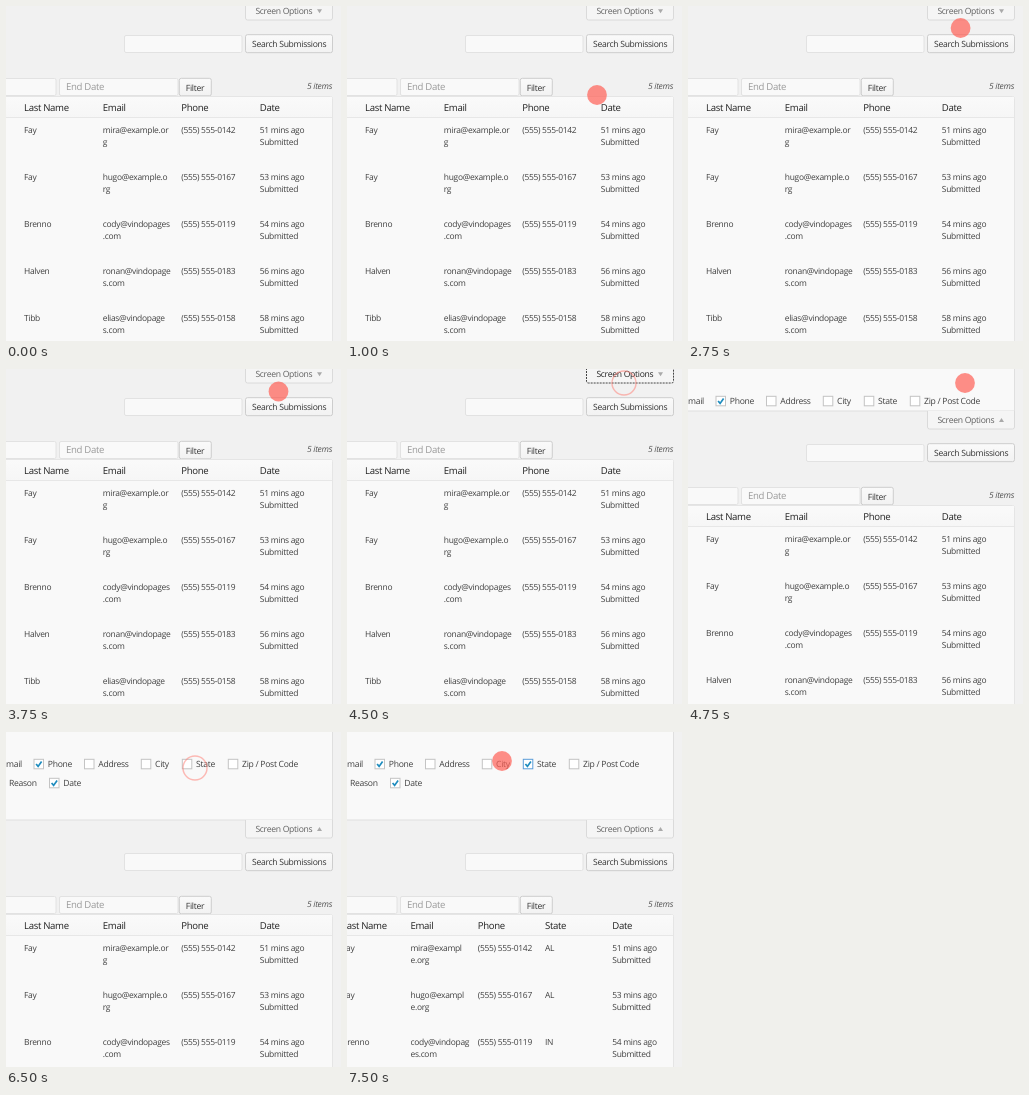
Recreate the animation shown at these times as an HTML page. Size 335 px wide and 335 px high, loop 8 s.

```html
<!DOCTYPE html>
<html lang="en">
<head>
<meta charset="utf-8">
<title>Submissions table</title>
<style>
  html, body { margin: 0; width: 100%; height: 100%; overflow: hidden; background: #f1f1f1; }
  svg { display: block; width: 100%; height: 100%; }
  text {
    font-family: "Open Sans", "Noto Sans", sans-serif;
    white-space: pre;
    letter-spacing: -.034em;
    text-rendering: geometricPrecision;
  }
</style>
</head>
<body>
<svg id="stage" viewBox="0 0 335 335"></svg>
<script>
const LOOP = 8000, TICK = 250, OPEN = 92;
const CLICKS = [4500, 6500];
const STATE_ON = 6750;
const stage = document.getElementById('stage');

// time, x, y
const PATH = [
  [1000, 250, 89], [1250, 248, 170], [1500, 186, 209], [1750, 198, 186],
  [2000, 232, 137], [2250, 268, 62], [2500, 283, 28], [2750, 272.6, 22],
  [3000, 272.6, 22], [3250, 268, 31], [4250, 277, 14], [5000, 277, 14],
  [5500, 275, 34], [5750, 258, 26], [6250, 196, 30], [6500, 189, 36],
  [6750, 189, 36], [7250, 168, 20], [7500, 155, 29]
];

// last name, mail user, mail domain, wrap points (wide, narrow), phone end, state, minutes
const ROWS = [
  ['Fay', 'mira', 'example.org', 15, 11, '0142', 'AL', 51],
  ['Fay', 'hugo', 'example.org', 14, 11, '0167', 'AL', 53],
  ['Brenno', 'cody', 'vindopages.com', 15, 13, '0119', 'IN', 54],
  ['Halven', 'ronan', 'vindopages.com', 15, 13, '0183', 'IN', 56],
  ['Tibb', 'elias', 'vindopages.com', 15, 13, '0158', 'AL', 58]
];

const text = (x, y, s, size = 8.6, fill = '#404040', extra = '') =>
  `<text x="${x}" y="${y}" font-size="${size}" fill="${fill}" ${extra}>${s}</text>`;
const rect = (x, y, w, h, fill, stroke = 'none', r = 0) =>
  `<rect x="${x}" y="${y}" width="${w}" height="${h}" rx="${r}" fill="${fill}" stroke="${stroke}"/>`;
const button = (x, y, w, h, label, tx) =>
  rect(x, y, w, h, 'url(#button)', '#cdcdcd', 2) + text(tx, y + 12.2, label, 8.6, '#333');
const input = (x, y, w) => rect(x, y, w, 17, '#f9f9f9', '#e2e2e2', 1.5);

const DEFS = `<defs>
  <linearGradient id="button" x2="0" y2="1"><stop stop-color="#fafafa"/><stop offset="1" stop-color="#f2f2f2"/></linearGradient>
  <linearGradient id="head" x2="0" y2="1"><stop stop-color="#fafafa"/><stop offset="1" stop-color="#f6f6f6"/></linearGradient>
</defs>`;

function cursorAt(t) {
  if (t < PATH[0][0]) return null;
  const i = PATH.findIndex(p => p[0] > t);
  if (i < 0) return PATH[PATH.length - 1].slice(1);
  const [t0, x0, y0] = PATH[i - 1], [t1, x1, y1] = PATH[i];
  const k = (t - t0) / (t1 - t0);
  return [x0 + (x1 - x0) * k, y0 + (y1 - y0) * k];
}

function table(withState) {
  const cols = withState ? [-5, 63.5, 130.8, 198, 265.3] : [18, 96.8, 175.2, 0, 253.8];
  const titles = ['Last Name', 'Email', 'Phone', 'State', 'Date'];
  let out = rect(-5, 90.5, 331.5, 260, '#f9f9f9', '#e5e5e5', 2)
    + rect(-5, 91, 331, 20.5, 'url(#head)')
    + rect(-5, 111, 331, 0.9, '#e6e6e6');
  const shown = i => withState || i !== 3;
  titles.forEach((s, i) => { if (shown(i)) out += text(cols[i], 104.8, s, 9.6, '#222'); });
  ROWS.forEach(([last, user, domain, wide, narrow, end, state, mins], n) => {
    const y = 127 + 47 * n, mail = user + '@' + domain, cut = withState ? narrow : wide;
    const cells = [[last], [mail.slice(0, cut), mail.slice(cut)], ['(555) 555-' + end],
      [state], [mins + ' mins ago', 'Submitted']];
    cells.forEach((lines, i) => {
      if (shown(i)) lines.forEach((s, j) => { out += text(cols[i], y + 12 * j, s, 8.45); });
    });
  });
  return out;
}

function checkbox(x, y, label, on, focus) {
  return rect(x + 0.5, y - 4.7, 9.5, 9.5, '#fff', focus ? '#5b9dd9' : '#c4c4c4')
    + (on ? `<path d="M${x + 2.6} ${y}l2 2.4 3.5-5" fill="none" stroke="#1e8cbe" stroke-width="1.7"/>` : '')
    + text(x + 14.3, y + 3.1, label);
}

function panel(slide, stateOn) {
  const bottom = slide - 4;
  if (bottom <= 0) return '';
  return `<clipPath id="fold"><rect width="335" height="${bottom}"/></clipPath>`
    + rect(-5, -5, 331.5, bottom + 5, '#f9f9f9', '#dfdfdf')
    + '<g clip-path="url(#fold)">'
    + text(-4.5, 35.1, 'Email') + checkbox(27.5, 32, 'Phone', true)
    + checkbox(78, 32, 'Address') + checkbox(134.8, 32, 'City')
    + checkbox(175.8, 32, 'State', stateOn, stateOn) + checkbox(221.8, 32, 'Zip / Post Code')
    + text(3, 54.1, 'Reason') + checkbox(43, 51, 'Date', true) + '</g>';
}

function tab(slide, hover, focus) {
  const y = slide - 4;
  const arrow = slide ? `M311 ${slide + 7}h5l-2.5-4z` : 'M311 3.2h5l-2.5 4z';
  const outline = focus ? 'stroke="#444" stroke-dasharray="2 1"' : 'stroke="#dadada"';
  return `<path d="M239.5 ${y}v16q0 2 2 2h83q2 0 2-2v-16" fill="#f5f5f5" ${outline}/>`
    + text(249.4, slide + 8.4, 'Screen Options', 8.6, hover ? '#222' : '#606060')
    + `<path d="${arrow}" fill="#aaa"/>`;
}

function cursor(pos, ring) {
  if (!pos) return '';
  const look = ring
    ? 'r="12" fill="none" stroke="#ff7a70" stroke-opacity=".5" stroke-width="1.4"'
    : 'r="9.9" fill="#ff5f55" fill-opacity=".7"';
  return `<circle cx="${pos[0]}" cy="${pos[1]}" ${look}/>`;
}

function draw(t) {
  const slide = OPEN * Math.min(1, Math.max(0, (t - CLICKS[0]) / 500));
  const stateOn = t >= STATE_ON;
  const pos = cursorAt(t);
  const hover = !slide && pos && pos[1] < 18 && pos[0] > 239;
  const click = CLICKS.includes(t);
  stage.innerHTML = DEFS + rect(0, 0, 335, 335, '#f1f1f1')
    + `<g transform="translate(0 ${slide})">`
    + input(118.5, 29.5, 117.5)
    + button(239.5, 28.7, 87, 18, 'Search Submissions', 246)
    + input(-5, 72.5, 55) + input(53.5, 72.5, 118.5)
    + text(60, 84.2, 'End Date', 9.6, '#9a9a9a')
    + button(173.3, 72.3, 32, 17.5, 'Filter', 179.8)
    + text(326, 82.6, '5 items', 8.5, '#555', 'font-style="italic" text-anchor="end"')
    + table(stateOn) + '</g>'
    + panel(slide, stateOn) + tab(slide, hover, hover && click)
    + cursor(pos, click);
}

let shownTick = -1;
function loop(now) {
  const tick = Math.floor((now % LOOP) / TICK);
  if (tick !== shownTick) draw((shownTick = tick) * TICK);
  requestAnimationFrame(loop);
}
draw(0);
requestAnimationFrame(loop);
</script>
</body>
</html>
```
